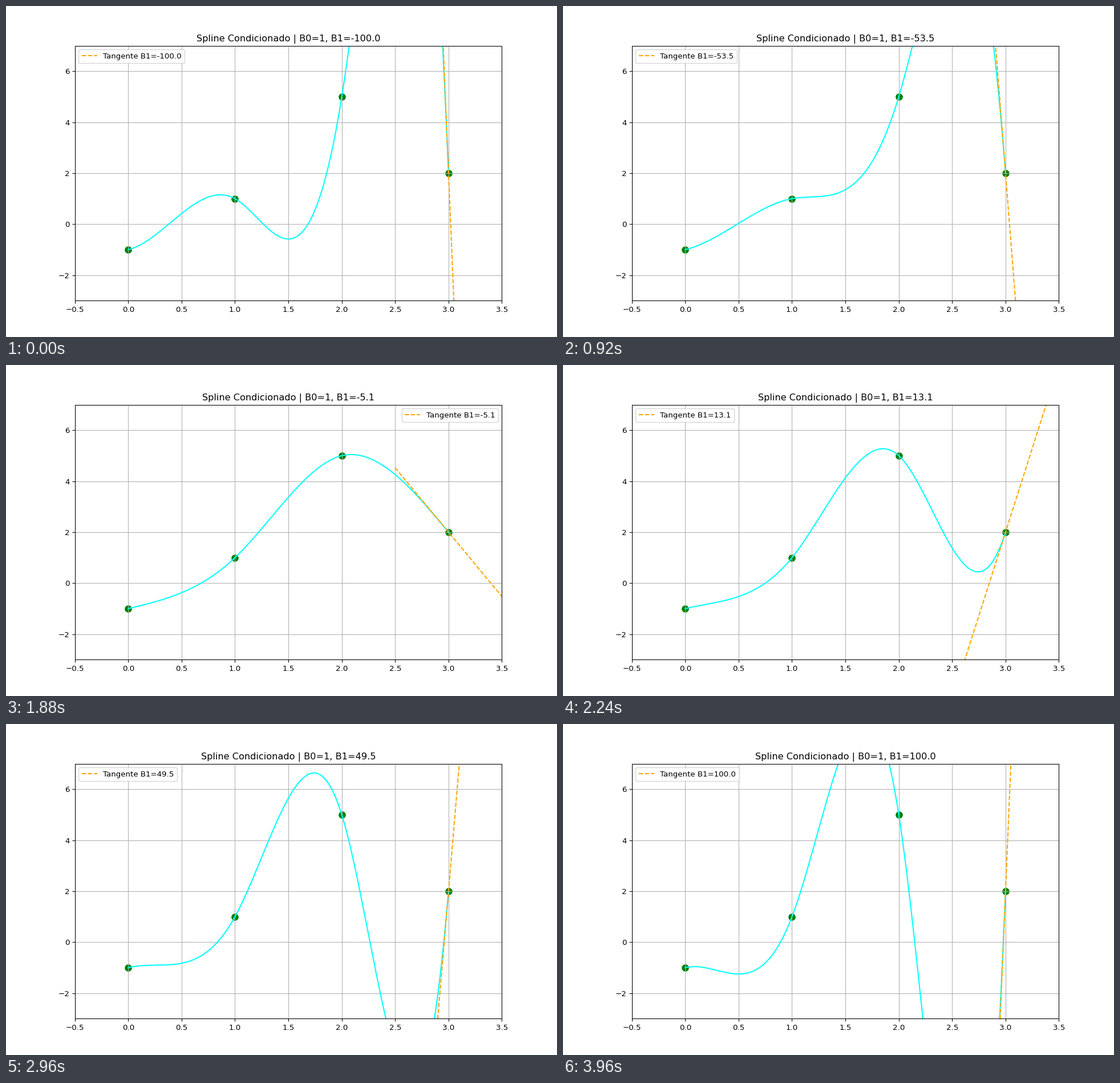
These frames come from a looping animation (966 by 580 pixels, 4000 ms). A matplotlib script:

```python
import numpy as np
import matplotlib.pyplot as plt
from matplotlib.animation import FuncAnimation

W, H, DPI = 966, 580, 96.6
FRAMES, INTERVAL = 100, 40

X = np.array([0.0, 1.0, 2.0, 3.0])
Y = np.array([-1.0, 1.0, 5.0, 2.0])
B0 = 1
SLOPES = np.linspace(-100, 100, FRAMES)


def clamped_spline(x, b0, b1):
    """Cubic spline through the unit-spaced knots with fixed end slopes."""
    system = np.array([[1, 0, 0, 0], [1, 4, 1, 0], [0, 1, 4, 1], [0, 0, 0, 1]])
    d = np.linalg.solve(system, [b0, 3 * (Y[2] - Y[0]), 3 * (Y[3] - Y[1]), b1])
    i = np.clip(x.astype(int), 0, len(X) - 2)
    t = x - X[i]
    rise = Y[i + 1] - Y[i]
    c2 = 3 * rise - 2 * d[i] - d[i + 1]
    c3 = d[i] + d[i + 1] - 2 * rise
    return Y[i] + t * (d[i] + t * (c2 + t * c3))


# The small margin keeps the pixel size from being rounded down.
fig, ax = plt.subplots(figsize=((W + 1e-3) / DPI, (H + 1e-3) / DPI), dpi=DPI)
ax.set_xlim(-0.5, 3.5)
ax.set_ylim(-3, 7)
ax.grid(True)
ax.scatter(X, Y, s=70, color="green")

xs = np.linspace(X[0], X[-1], 301)
xt = np.linspace(2.5, 3.5, 100)
curve, = ax.plot([], [], color="cyan")
tangent, = ax.plot([], [], "--", color="orange")


def update(n):
    b1 = SLOPES[n]
    curve.set_data(xs, clamped_spline(xs, B0, b1))
    tangent.set_data(xt, Y[-1] + b1 * (xt - X[-1]))
    tangent.set_label(f"Tangente B1={b1:.1f}")
    ax.set_title(f"Spline Condicionado | B0={B0}, B1={b1:.1f}")
    ax.legend(loc="best")
    return curve, tangent


anim = FuncAnimation(fig, update, frames=FRAMES, interval=INTERVAL,
                     repeat=True, repeat_delay=0)
plt.show()
```
